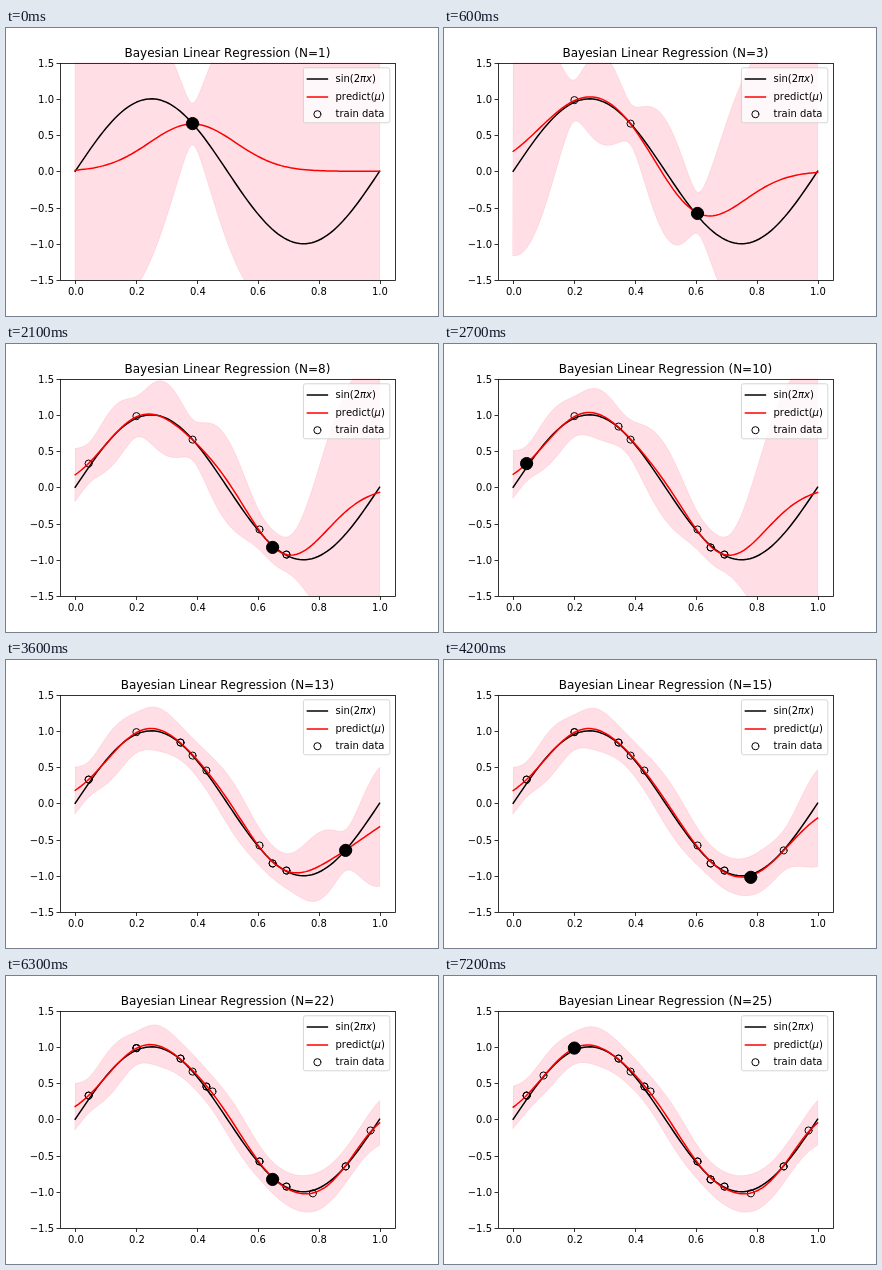
Recreate the animation shown at these times as an HTML page with a canvas. Size 432x288 px, loop 7.5 s.

```html
<!DOCTYPE html>
<html lang="en">
<head>
<meta charset="utf-8">
<title>Bayesian Linear Regression</title>
<style>
html, body { margin: 0; width: 100%; height: 100%; overflow: hidden; background: #fff; }
canvas { display: block; }
</style>
</head>
<body>
<canvas id="stage" width="432" height="288"></canvas>
<script>
const ctx = document.getElementById('stage').getContext('2d');
const W = 432, H = 288, STEP = 300;
const AXES = { left: 54, right: 388.8, top: 34.56, bottom: 252 };
const SANS = '"DejaVu Sans", Verdana, sans-serif';

// Observations by letter, and the order in which they are drawn
const POINTS = {
  A: [.3855, .658], B: [.201, .982], C: [.6055, -.582], D: [.044, .327],
  E: [.694, -.928], F: [.346, .838], G: [.6485, -.83], H: [.431, .452],
  I: [.8885, -.65], J: [.7805, -1.022], K: [.451, .384], L: [.0995, .604],
  M: [.9702, -.154]
};
const draws = [...'ABCDEGEGFDHFIBJHBCKIMGDLB'].map(key => POINTS[key]);

const px = x => 69.218 + 304.364 * x;
const py = y => 143.28 - 72.48 * y;
const snap = v => Math.floor(v + .5) + .5;
const range = (n, f) => Array.from({ length: n }, (_, i) => f(i));
const dot = (a, b) => a.reduce((sum, v, i) => sum + v * b[i], 0);

// Bayesian regression on evenly spaced Gaussian basis functions
const BASES = 25, WIDTH = .1, ALPHA = 1, BETA = 25;
const basis = x => range(BASES, j => Math.exp(-((x - j / (BASES - 1)) ** 2) / (2 * WIDTH ** 2)));
const xs = range(100, i => i / 99);
const features = xs.map(basis);

function fitAll() {
  let mean = new Array(BASES).fill(0);
  let cov = range(BASES, i => range(BASES, j => (i === j ? 1 / ALPHA : 0)));
  return draws.map(([x, y]) => {
    const phi = basis(x);
    const gain = cov.map(row => dot(row, phi));
    const scale = 1 / (1 / BETA + dot(phi, gain));
    const error = y - dot(phi, mean);
    mean = mean.map((m, i) => m + gain[i] * scale * error);
    cov = cov.map((row, i) => row.map((c, j) => c - gain[i] * gain[j] * scale));
    return {
      mu: features.map(f => dot(f, mean)),
      sd: features.map(f => Math.sqrt(1 / BETA + dot(f, cov.map(row => dot(row, f)))))
    };
  });
}
const fits = fitAll();

function trace(ys, color) {
  ctx.beginPath();
  ys.forEach((y, i) => ctx.lineTo(px(xs[i]), py(y)));
  ctx.strokeStyle = color;
  ctx.lineWidth = 1.5;
  ctx.lineCap = 'square';
  ctx.lineJoin = 'round';
  ctx.stroke();
}

function line(x1, y1, x2, y2, color, width) {
  ctx.beginPath();
  ctx.moveTo(x1, y1);
  ctx.lineTo(x2, y2);
  ctx.strokeStyle = color;
  ctx.lineWidth = width;
  ctx.stroke();
}

function circle(x, y, size, filled) {
  ctx.beginPath();
  ctx.arc(x, y, Math.sqrt(size) / 2, 0, 2 * Math.PI);
  ctx.strokeStyle = ctx.fillStyle = '#000';
  ctx.lineWidth = 1;
  if (filled) ctx.fill();
  ctx.stroke();
}

function text(str, x, y, size = 10, align = 'left', style = '') {
  ctx.font = `${style} ${size}px ${SANS}`;
  ctx.fontKerning = 'none';
  ctx.textAlign = align;
  ctx.fillStyle = '#000';
  ctx.fillText(str, x, y);
  return x + ctx.measureText(str).width;
}

function band({ mu, sd }) {
  ctx.beginPath();
  xs.forEach((x, i) => ctx.lineTo(px(x), py(mu[i] + sd[i])));
  for (let i = xs.length - 1; i >= 0; i--) ctx.lineTo(px(xs[i]), py(mu[i] - sd[i]));
  ctx.closePath();
  ctx.fillStyle = ctx.strokeStyle = 'rgba(255, 192, 203, .5)';
  ctx.lineWidth = 1;
  ctx.lineJoin = 'miter';
  ctx.fill();
  ctx.stroke();
}

function axes() {
  ctx.lineCap = 'butt';
  ctx.lineJoin = 'miter';
  ctx.strokeStyle = '#000';
  ctx.lineWidth = .8;
  const left = snap(AXES.left), top = snap(AXES.top);
  ctx.strokeRect(left, top, snap(AXES.right) - left, snap(AXES.bottom) - top);
  for (let i = 0; i <= 5; i++) {
    const x = px(i / 5);
    line(snap(x), 252.5, snap(x), 256, '#000', .8);
    text((i / 5).toFixed(1), Math.round(x - 7.4), 267);
  }
  for (let v = -1.5; v <= 1.5; v += .5) {
    const y = py(v);
    line(50.5, snap(y), 54, snap(y), '#000', .8);
    text((v < 0 ? '\u2212' : '') + Math.abs(v).toFixed(1), 48, Math.round(y + 4), 10, 'right');
  }
}

function legend() {
  ctx.beginPath();
  ctx.roundRect(297.4, 39.8, 86.4, 55, 2);
  ctx.fillStyle = 'rgba(255, 255, 255, .8)';
  ctx.strokeStyle = 'rgba(204, 204, 204, .8)';
  ctx.lineWidth = 1;
  ctx.fill();
  ctx.stroke();
  ctx.lineCap = 'square';
  line(301.4, 51, 321.4, 51, '#000', 1.5);
  line(301.4, 69, 321.4, 69, '#f00', 1.5);
  circle(311.4, 86.2, 50);

  let x = text('sin(2', 329.5, 54);
  x = text('πx', x, 54, 10, 'left', 'italic');
  text(')', x, 54);
  x = text('predict(', 329.5, 72);
  x = text('μ', x, 72, 10, 'left', 'italic');
  text(')', x, 72);
  text('train data', 329.5, 89);
}

const truth = xs.map(x => Math.sin(2 * Math.PI * x));

function draw(index) {
  ctx.fillStyle = '#fff';
  ctx.fillRect(0, 0, W, H);

  ctx.save();
  ctx.beginPath();
  ctx.rect(AXES.left, AXES.top, AXES.right - AXES.left, AXES.bottom - AXES.top);
  ctx.clip();
  band(fits[index]);
  // Repeated observations overprint, so their rings look bolder
  draws.slice(0, index).forEach(([x, y]) => circle(px(x), py(y), 50));
  trace(truth, '#000');
  trace(fits[index].mu, '#f00');
  const [x, y] = draws[index];
  circle(px(x), py(y), 150, true);
  ctx.restore();

  axes();
  text(`Bayesian Linear Regression (N=${index + 1})`, 221.4, 28.6, 12, 'center');
  legend();
}

const start = performance.now();
let shown = -1;
function tick() {
  const index = Math.floor((performance.now() - start) / STEP) % draws.length;
  if (index !== shown) draw(shown = index);
  requestAnimationFrame(tick);
}
tick();
</script>
</body>
</html>
```
